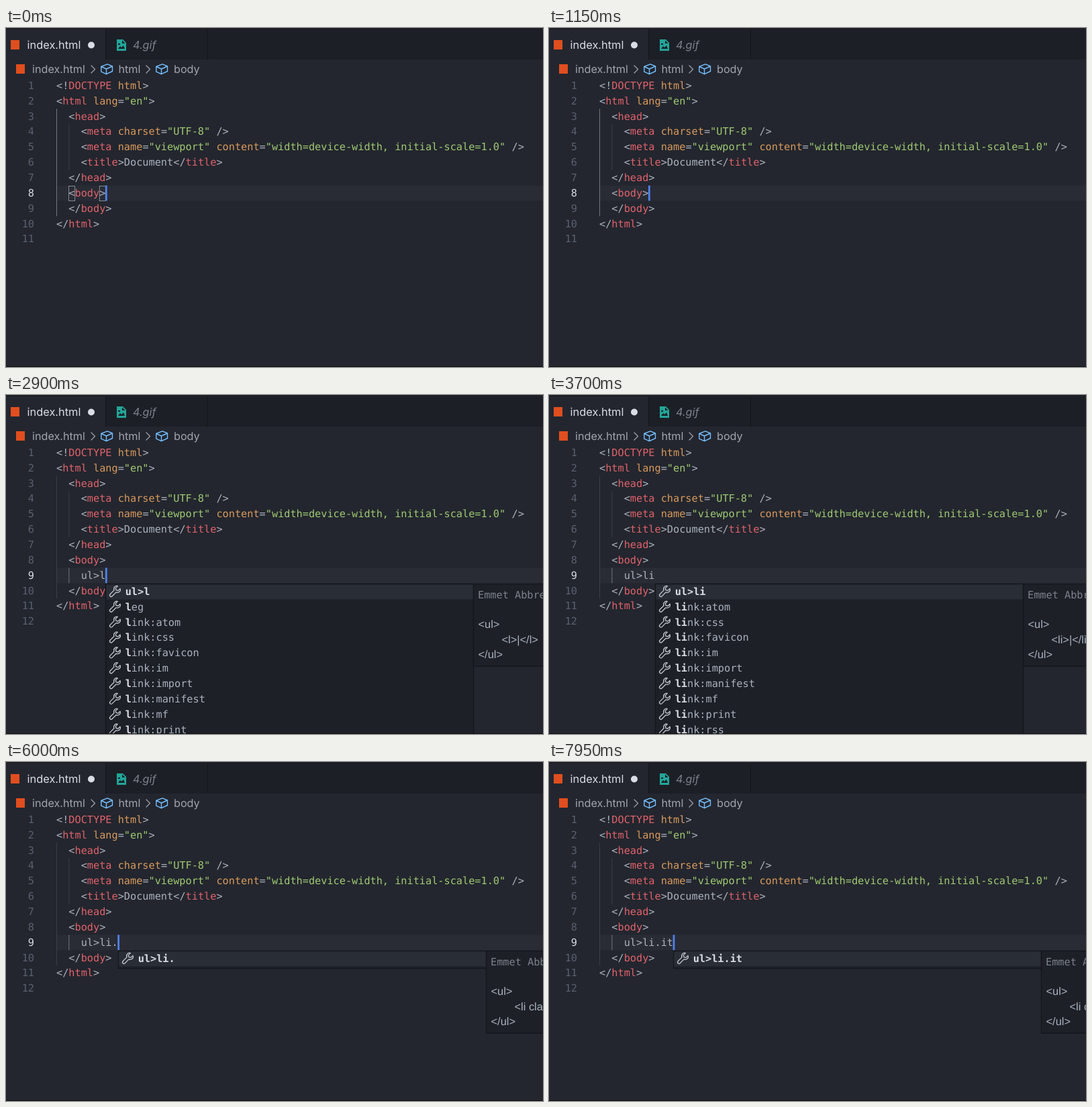
Recreate the animation shown at these times as an HTML page with a canvas. Size 800x505 px, loop 8000 ms.

```html
<!DOCTYPE html>
<html lang="en">
<head>
<meta charset="utf-8">
<style>
  html, body { margin: 0; width: 100%; height: 100%; overflow: hidden; background: #23262e; }
  canvas { display: block; }
</style>
</head>
<body>
<canvas id="stage" width="800" height="505"></canvas>
<script>
const ctx = document.getElementById('stage').getContext('2d');
ctx.textRendering = 'geometricPrecision';

const LOOP = 8000, LEFT = 75, TOP = 74.6, ROW = 22.85, CHAR = 9.17;
const MONO = '15.23px "DejaVu Sans Mono", monospace';
const BOLD = 'bold ' + MONO;
const TAB = '16.4px Inter, sans-serif';
const UI = '16.2px Inter, sans-serif';
const DOC = '16.4px "Liberation Sans", sans-serif';
const C = {
  bg: '#23262e', bar: '#1c1f26', edge: '#14161b', row: '#292c35', popup: '#1d2027', selected: '#292d36',
  text: '#abb2bf', bright: '#dadde3', dim: '#5a6070', muted: '#7d828c', guide: '#3a3e47', activeGuide: '#70757f',
  tag: '#e2626c', attr: '#d99a5d', string: '#9fca73', caret: '#4f83f0', cube: '#75beff', html: '#e04e1f', teal: '#22a699'
};

const HEAD = [
  '<!DOCTYPE html>',
  '<html lang="en">',
  '  <head>',
  '    <meta charset="UTF-8" />',
  '    <meta name="viewport" content="width=device-width, initial-scale=1.0" />',
  '    <title>Document</title>',
  '  </head>',
  '  <body>'
];
const TAIL = ['  </body>', '</html>', ''];
const LINKS = ['atom', 'css', 'favicon', 'im', 'import', 'manifest', 'mf', 'print', 'rss'].map(s => 'link:' + s);

// Typed line at each moment; null means the line does not exist yet.
const EDITS = [
  [0, null], [1600, ''], [2050, 'u'], [2300, 'ul'], [2550, 'ul>'], [2750, 'ul>l'], [3200, 'ul>li'],
  [4000, 'ul>li.'], [6350, 'ul>li.d'], [6650, 'ul>li.dk'], [7300, 'ul>li.d'], [7500, 'ul>li.'],
  [7700, 'ul>li.i'], [7850, 'ul>li.it']
];
const BRACKETS_END = 600;

function rect(x, y, w, h, color) {
  ctx.fillStyle = color;
  ctx.fillRect(x, y, w, h);
}

function write(text, x, y, color, font = MONO, align = 'left') {
  ctx.font = font;
  ctx.textAlign = align;
  ctx.fillStyle = color;
  ctx.fillText(text, x, y);
}

function outline(path, x, y, color, width) {
  ctx.save();
  ctx.translate(x, y);
  ctx.strokeStyle = color;
  ctx.lineWidth = width;
  ctx.lineJoin = ctx.lineCap = 'round';
  ctx.stroke(new Path2D(path));
  ctx.restore();
}

const columnX = column => LEFT + column * CHAR;
const rowY = index => TOP + index * ROW;

function guide(column, from, to, color) {
  rect(columnX(column), rowY(from), 1, (to - from) * ROW, color);
}

function cube(x) {
  outline('M.8 4.5 10 .8 17.5 4V11.5L8.5 15.7 .8 12.2ZM.8 4.5 8.5 8 17.5 4M8.5 8V15.7', x, 53, C.cube, 1.4);
}

function header() {
  rect(0, 0, 800, 47, C.bar);
  rect(0, 2, 148, 45, C.bg);
  rect(148, 2, 1, 45, C.edge);
  rect(300, 2, 1, 45, C.edge);
  rect(7, 18, 13, 14, C.html);
  write('index.html', 31.5, 30.5, C.bright, TAB);
  ctx.beginPath();
  ctx.arc(127, 25.5, 5, 0, 7);
  ctx.fill();

  ctx.fillStyle = C.teal;
  ctx.fill(new Path2D('M165 17h9l5 5v12h-14z'));
  ctx.fillStyle = C.bar;
  ctx.fill(new Path2D('M173 18.5v4.5h4.5zM167 31l3-4 2 2 3-3 2 5z'));
  rect(167, 23, 3, 2, C.bar);
  write('4.gif', 189, 30.5, C.muted, 'italic ' + UI);

  rect(15, 54, 13, 14, C.html);
  write('index.html', 39, 67, '#a1a5ad', UI);
  write('html', 167.5, 67, '#a1a5ad', UI);
  write('body', 250, 67, '#a1a5ad', UI);
  for (const x of [127, 209]) outline('M0 0 5.5 5.5 0 11', x, 56, '#9da1a9', 1.3);
  cube(141);
  cube(223);
}

function codeLine(line, y) {
  const tokens = /("[^"]*")|(?<=<[!\/]?)(\w+)|(?<=[\w"] )(\w+)(?=[=>])|\w+|[^"\w\s]/g;
  for (const m of line.matchAll(tokens)) {
    const color = m[1] ? C.string : m[2] ? C.tag : m[3] ? C.attr : C.text;
    write(m[0], columnX(m.index), y, color);
  }
}

function editor(typed, now, since) {
  const started = typed !== null;
  const lines = started ? [...HEAD, '    ' + typed, ...TAIL] : [...HEAD, ...TAIL];
  const active = started ? 8 : 7;
  const caretX = columnX(lines[active].length);

  rect(LEFT + 1, rowY(active), 725, ROW, C.row);
  guide(0, 2, started ? 10 : 9, started ? C.guide : C.activeGuide);
  guide(2, 3, 6, C.guide);
  if (started) guide(2, 8, 9, C.activeGuide);

  lines.forEach((line, i) => {
    const baseline = rowY(i) + 16.3;
    write(i + 1, 42, baseline, i === active ? C.bright : C.dim, MONO, 'right');
    codeLine(line, baseline);
  });

  if (!started && now < BRACKETS_END) {
    ctx.strokeStyle = '#858a93';
    ctx.lineWidth = 1;
    for (const column of [2, 7]) ctx.strokeRect(columnX(column) + .2, 235.5, 9, 22);
  }
  if (since % 1000 < 500) rect(caretX - .4, rowY(active), 2.7, ROW, C.caret);
  return caretX;
}

function suggestions(typed, caretX) {
  const prefix = typed.split('>')[1];
  if (!prefix) return;
  const left = Math.round(caretX) + .5, width = 548;
  const links = { l: ['leg', ...LINKS], li: LINKS }[prefix] || [];
  const height = links.length ? 240 : 26;

  ctx.strokeStyle = C.edge;
  ctx.lineWidth = 1.3;
  rect(left, 281, width, height, C.popup);
  rect(left, 282, width, 22.5, C.selected);
  ctx.strokeRect(left, 281.5, width, height);
  [typed, ...links].forEach((label, i) => {
    const y = 297.9 + i * ROW;
    const textX = left + 29.2;
    const match = i ? prefix : typed;
    outline('M16 4.5 13 7.5 10 6.7 9.3 3.7 12.3.8C9-.5 5.5 3 7 7L1.2 12.8a2 2 0 0 0 3 3L10 10c4 1.5 7.5-2 6-5.5z',
      left + 5.5, y - 14, '#c5c8ce', 1.3);
    write(match, textX, y, C.bright, BOLD);
    write(label.slice(match.length), textX + match.length * CHAR, y, C.text);
  });

  const [tag, name] = prefix.split('.');
  const item = name === undefined ? `<${tag}>|</${tag}>` : `<${tag} class="${name}">|</${tag}>`;
  const docX = left + width;
  rect(docX, 281, 300, 123, C.popup);
  ctx.strokeRect(docX, 281.5, 300, 122.5);
  write('Emmet Abbreviation', docX + 6.5, 303, C.muted);
  write('<ul>', docX + 7, 346.5, C.text, DOC);
  write(item, docX + 42, 369.5, C.text, DOC);
  write('</ul>', docX + 7, 392, C.text, DOC);
}

function draw(now) {
  const [start, typed] = EDITS.findLast(([time]) => time <= now);
  rect(0, 0, 800, 505, C.bg);
  header();
  const caretX = editor(typed, now, now - start);
  if (typed) suggestions(typed, caretX);
  rect(0, 504, 800, 1, '#0d0f12');
}

const begin = performance.now();
function tick() {
  draw((performance.now() - begin) % LOOP);
  requestAnimationFrame(tick);
}
tick();
</script>
</body>
</html>
```
